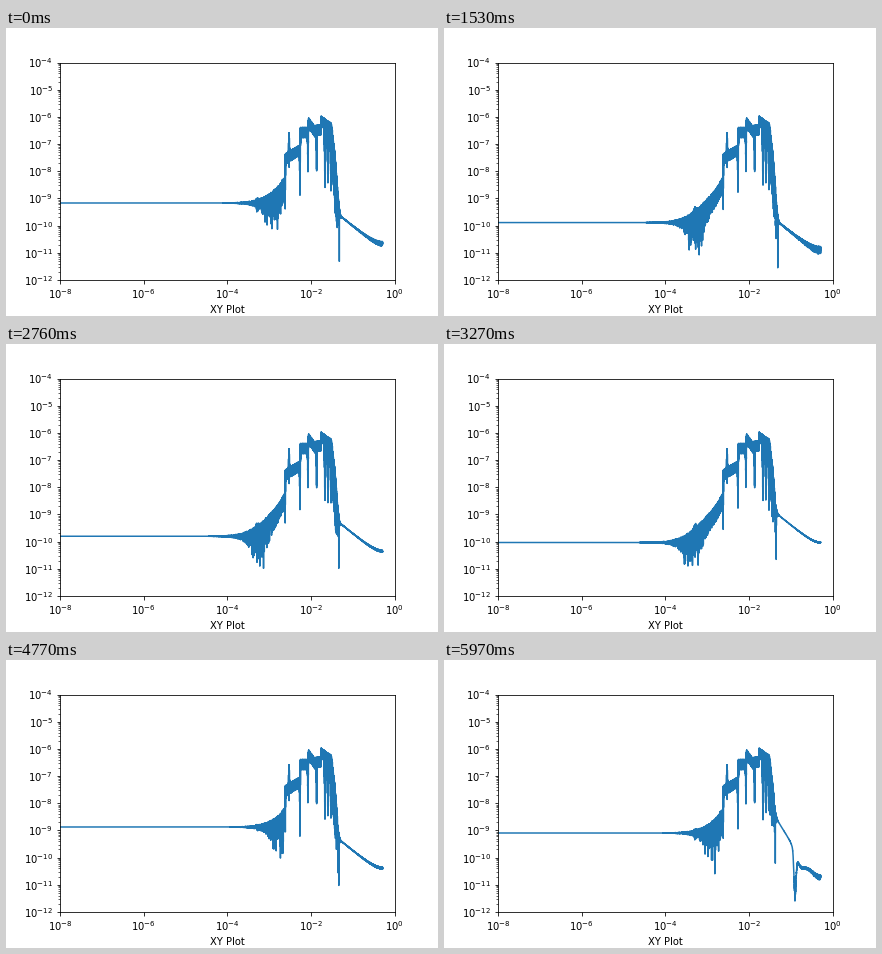
A matplotlib script that plays this animation: 432 by 288 pixels, repeating every 6 s.

```python
import numpy as np
import matplotlib.pyplot as plt
from matplotlib.animation import FuncAnimation
from matplotlib.ticker import LogLocator, NullLocator

FRAMES, STEP = 200, 30
LOOP = FRAMES * STEP
LEFT, BASE = 54, 252          # pixel position of the axes corner
PX_X, PX_Y = 41.85, 27.18     # pixels per decade

# Key times with the height of the flat floor and of the tail's end
KEY_MS = [0, 780, 2250, 3270, 4080, 4770, 5970]
FLOOR_Y = [175, 203.5, 186, 198.5, 174.5, 167, 173]
TAIL_Y = [215.5, 228, 215.5, 198.5, 201, 208, 217]

# Shelves of the steady spectrum: start x, top y, slope
SHELVES = np.array([(279, 126, -0.6), (294, 99.5, 0), (302, 89, 1.4),
                    (310, 97, 0), (315, 88, 0.7)])
NOTCHES = [(279, 58), (283, 28), (294, 40), (302, 35), (310.6, 42)]
FALL = 325                    # where the last shelf drops off

plt.rcParams.update({"font.size": 10, "font.family": "DejaVu Sans"})


def freq(px):
    return 10 ** ((px - LEFT) / PX_X - 8)


def level(py):
    return 10 ** ((BASE - py) / PX_Y - 12)


def bump(px, x, width):
    return np.exp(-((px - x) / width) ** 2)


def plateau(px, mix):
    """Shelves with notches, then a comb, then a steep fall."""
    row = np.searchsorted(SHELVES[:, 0], px, side="right") - 1
    x0, y0, slope = SHELVES[np.maximum(row, 0)].T
    top = y0 + slope * (px - x0) + 4 * np.maximum(px - FALL, 0) ** 1.45
    depth = 10 + sum(d * bump(px, x, 0.4) for x, d in NOTCHES)
    comb = 6 + 50 * np.cos(np.pi * (px - 319) / 3) ** 6
    depth += np.where(px > FALL, 35, np.where(px > 317.5, comb, 0))
    top -= 21 * bump(px, 283, 0.5)
    return level(top + depth * mix)


def foothill(px, mix):
    """Noise that grows as a power of frequency."""
    rise = 4e-9 * (freq(px) / freq(278)) ** 1.9
    rise *= 1 + 0.6 * bump(px, 251, 1.5) + 0.4 * bump(px, 279, 4)
    return rise * 0.3 ** mix


rng = np.random.default_rng(7)
px = np.arange(195, 376.6, 1 / 36)
n = px.size
mix = rng.beta(0.4, 0.4, n)
body = np.where(px < SHELVES[0, 0], foothill(px, mix), plateau(px, mix))
body = body + 4.5e-12 * np.sqrt(rng.random(n)) * (px > 336)
phase = rng.uniform(0, 2 * np.pi, n)
spin = rng.integers(-8, 9, n)

f = freq(px)
climb = np.log(np.sin(np.pi * f)) / np.log(np.sin(np.pi * freq(335)))
dip = 38 * bump(px, 351, 1.5) + 10 * bump(px, 356, 6)
is_tail = px > 320
slope_edge = plateau(px, 0)
xs = np.r_[1e-8, f]


def spectrum(ms):
    floor = np.interp(ms, KEY_MS, FLOOR_Y, period=LOOP)
    end = np.interp(ms, KEY_MS, TAIL_Y, period=LOOP)
    swell = max(0, (ms - 5700) / 270)
    tail = end - 27 * (1 + swell) * climb + swell * dip
    leak = level(np.where(is_tail, tail, floor))
    turn = phase + 2 * np.pi * spin * ms / LOOP
    ys = np.abs(leak + body * np.exp(1j * turn))
    # the two parts cancel where the falling edge meets the tail
    null = np.argmax(is_tail & (slope_edge < leak))
    ys[null] = 0.02 * leak[null]
    return np.r_[level(floor), ys]


fig = plt.figure(figsize=(6, 4), dpi=72)
fig.subplots_adjust(left=0.125, right=0.9, bottom=0.125, top=0.88)
ax = fig.add_subplot()
ax.set(xscale="log", yscale="log", xlim=(1e-8, 1), ylim=(1e-12, 1e-4),
       xlabel="XY Plot")
ax.set_xticks(10.0 ** np.arange(-8, 1, 2))
ax.xaxis.set_minor_locator(NullLocator())
ax.yaxis.set_major_locator(LogLocator(numticks=12))
line, = ax.plot(xs, spectrum(0), color="#1f77b4", lw=1.5)


def update(i):
    line.set_ydata(spectrum(i * STEP))
    return line,


anim = FuncAnimation(fig, update, frames=FRAMES, interval=STEP,
                     repeat=True, repeat_delay=0)
plt.show()
```
